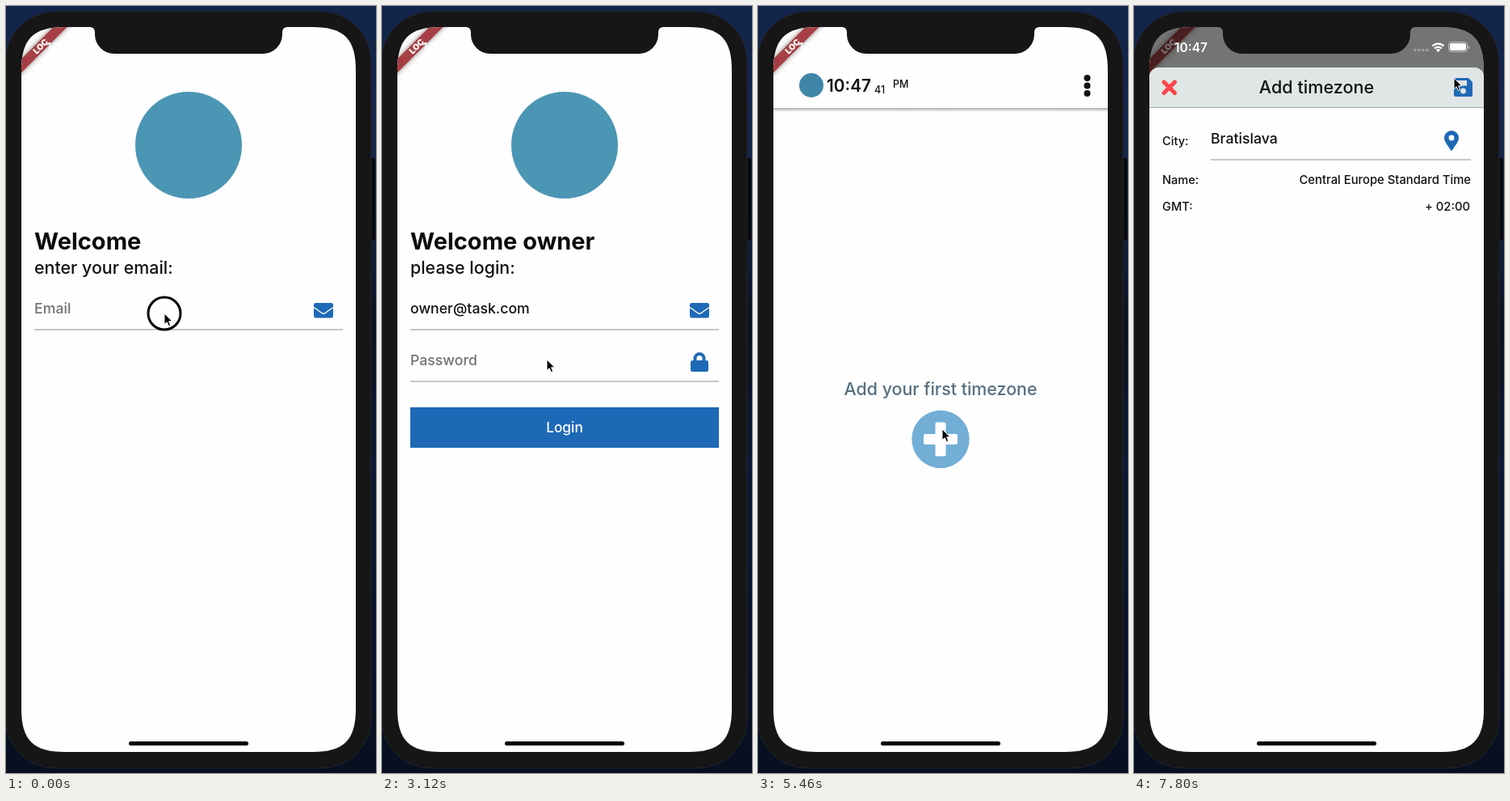
Write an HTML page that moves like this. It is 458 by 948 pixels and loops after 8000 ms.

```html
<!DOCTYPE html>
<html lang="en">
<head>
<meta charset="utf-8">
<title>Time zone app</title>
<style>
html, body { margin: 0; width: 100%; height: 100%; overflow: hidden; background: #0b1830; }
svg { display: block; width: 458px; height: 948px; }
text { font-family: Inter, "Open Sans", sans-serif; font-weight: 500; white-space: pre; }
</style>
</head>
<body>
<svg viewBox="0 0 458 948" xmlns="http://www.w3.org/2000/svg">
  <defs>
    <linearGradient id="sky" x2="0" y2="1">
      <stop offset="0" stop-color="#12254a"/><stop offset=".25" stop-color="#14264a"/>
      <stop offset=".42" stop-color="#0a1220"/><stop offset=".6" stop-color="#0b1a38"/>
      <stop offset="1" stop-color="#070f20"/>
    </linearGradient>
    <linearGradient id="shade" x2="0" y2="1">
      <stop offset="0" stop-color="#000" stop-opacity=".32"/><stop offset="1" stop-color="#000" stop-opacity="0"/>
    </linearGradient>
    <filter id="soft" x="-30%" y="-30%" width="160%" height="160%">
      <feDropShadow dx="0" dy="0" stdDeviation="3" flood-opacity=".5"/>
    </filter>
    <clipPath id="screen">
      <path d="M73 26H379C418.500 26 433 40.500 433 80V868C433 907.500 418.500 922 379 922H73C33.500 922 19 907.500 19 868V80C19 40.500 33.500 26 73 26Z"/>
    </clipPath>
  </defs>
  <rect width="458" height="948" fill="url(#sky)"/>
  <path d="M0 128v29M0 190v58M0 260v57" stroke="#000" stroke-width="3"/>
  <rect x="449" y="188" width="8" height="102" rx="2" fill="#08090c"/>
  <rect x="-1" y="7" width="453" height="935" rx="62" fill="#161616" stroke="#22252b"/>
  <g id="view" clip-path="url(#screen)"></g>
  <path d="M104 26a6 6 0 0 1 6 6V35a24 24 0 0 0 24 24H318a24 24 0 0 0 24-24V32a6 6 0 0 1 6-6V24H104Z" fill="#161616"/>
  <g id="pointer"></g>
</svg>
<script>
const LOOP = 8000, STEP = 260;
const BLUE = '#1e69b6', HINT = '#727272';
const EMAIL = 'owner@task.com', CITY = 'Bratislava';
const view = document.getElementById('view');
const pointer = document.getElementById('pointer');
const pen = document.createElement('canvas').getContext('2d');

const clamp = v => Math.max(0, Math.min(1, v));
const easeOut = (t, a, b) => 1 - (1 - clamp((t - a) / (b - a))) ** 3;
const during = (t, a, b) => t >= a && t < b;
const typed = (word, t, start, pace) => word.slice(0, Math.max(0, Math.floor((t - start) / pace + .01)));

const rect = (x, y, w, h, fill, rx = 0) =>
  `<rect x="${x}" y="${y}" width="${w}" height="${h}" rx="${rx}" fill="${fill}"/>`;
const circle = (x, y, r, fill) => `<circle cx="${x}" cy="${y}" r="${r}" fill="${fill}"/>`;
const path = (d, fill, more = '') => `<path d="${d}" fill="${fill}" ${more}/>`;
const line = (d, color, w, more = '') => path(d, 'none', `stroke="${color}" stroke-width="${w}" ${more}`);
const text = (s, x, y, size, fill = '#111', more = '') =>
  `<text x="${x}" y="${y}" font-size="${size}" fill="${fill}" ${more}>${s}</text>`;
const weight = w => `style="font-weight:${w}"`;
const MID = 'text-anchor="middle"', END = 'text-anchor="end"';
const LIGHT = `${MID} ${weight(400)}`;

const mail = rect(381, 367, 24, 18.5, BLUE, 2.5) +
  line('M381 372.5L391 379.5Q393 381 395 379.5L405 372.5', '#fff', 1.5);
const lock = rect(382, 438, 22, 14, BLUE, 2.5) +
  line('M387.5 439V435.5a5.5 5.5 0 0 1 11 0V439', BLUE, 4);
const pin = path('M393 179.5C389 173 384 168 384 163a9 9 0 0 1 18 0C402 168 397 173 393 179.5Z', BLUE) +
  circle(393, 163, 3.4, '#fff');
const save = path('M398 89H414L419 94V110a2 2 0 0 1-2 2H398a2 2 0 0 1-2-2V91a2 2 0 0 1 2-2Z', BLUE) +
  rect(399.5, 92, 12.5, 6.5, '#e0e5e6') + circle(407.5, 105, 3.4, '#e0e5e6');

function field(value, hint, x, y, focused, lineY) {
  pen.font = '500 17.7px Inter, "Open Sans", sans-serif';
  const end = x + pen.measureText(value).width;
  return text(value || hint, x, y, 17.7, value ? '#111' : HINT) +
    line(`M${x} ${lineY}H417`, focused ? '#1f78ba' : '#b4b4b4', focused ? 2.2 : 1.5) +
    (focused ? rect(end - .5, y - 17, 2, 23, '#1f78ba') : '');
}

function signIn(t) {
  const known = t >= 2860;
  const dots = Math.floor(clamp((t - 3510) / 650) * 5 + .01);
  const mailText = typed(EMAIL, t, 520, 130);
  let s = circle(226, 172, 66, '#4b96b4') +
    text(known ? 'Welcome owner' : 'Welcome', 35, 301, 29, '#0b0b0b', weight(700)) +
    text(known ? 'please login:' : 'enter your email:', 35, 331, 21.4) +
    field(mailText, 'Email', 35, 380, during(t, 260, 2500), 400) + mail;
  if (!known) return s;
  s += field('', dots ? '' : 'Password', 35, 444, false, 464) + lock;
  if (during(t, 3380, 4100)) {
    s += line('M35 464H417', '#1f78ba', 2.2) + rect(35 + dots * 7.4, 427, 2, 23, '#1f78ba');
  }
  for (let i = 0; i < dots; i++) s += circle(38.5 + i * 7.4, 438.5, 2.4, '#111');
  return s + rect(35, 496, 382, 50, BLUE) + text('Login', 226, 527, 17.3, '#fff', MID);
}

function home(t) {
  const sec = 41 + Math.floor((t - 5460) / 1000);
  return rect(19, 126, 414, 5, 'url(#shade)') + circle(66, 98, 15, '#3f86a8') +
    text('10:47', 85, 106, 20.8, '#111', weight(600)) + text(sec, 144, 108, 12.5) + text('PM', 167, 101, 12.5) +
    [89, 98.5, 108].map(y => circle(407.5, y, 4, '#111')).join('') +
    text('Add your first timezone', 226, 481, 21.4, '#566f80', MID) +
    circle(226, 535.5, 35.7, '#72aed6') +
    rect(205, 529, 42, 13, '#fff', 2) + rect(219.5, 514.5, 13, 42, '#fff', 2);
}

function dialog(t) {
  const city = typed(CITY, t, 6500, 78);
  let s = path('M19 922V88a12 12 0 0 1 12-12H421a12 12 0 0 1 12 12V922Z', '#fefefe') +
    path('M19 125V88a12 12 0 0 1 12-12H421a12 12 0 0 1 12 12V125Z', '#e0e5e6') +
    line('M19 125.5H433', '#a5adb1', 1) +
    line('M37 94L50.5 107.5M50.5 94L37 107.5', '#f8474a', 5.2, 'stroke-linecap="round"') +
    text('Add timezone', 226, 108, 21.6, '#111', MID) + save +
    text('City:', 35, 172, 14.6) + field(city, 'Type city...', 95, 170, during(t, 6240, 7400), 190) + pin;
  if (t >= 7540) {
    s += text('Name:', 35, 220, 14.6) + text('Central Europe Standard Time', 417, 220, 14.8, '#111', END) +
      text('GMT:', 35, 253, 14.6) + text('+ 02:00', 416, 253, 14.8, '#111', END);
  }
  return s;
}

function key(x, y, w, label, fill = '#898989', size = 25) {
  return rect(x, y + 1, w, 45, '#484848', 5) + rect(x, y, w, 45, fill, 5) +
    text(label, x + w / 2, y + (size > 20 ? 30 : 28), size, '#fff', LIGHT);
}

function keyboard(kind, words) {
  const dark = '#666';
  let s = rect(19, 576, 414, 346, '#5e5e5e') + line('M156.5 590V612M294.5 590V612', '#707070', 1);
  words.forEach((w, i) => s += text(w, 88 + i * 138, 608, 17, '#eee', LIGHT));
  [['qwertyuiop', 23.5, 629], ['asdfghjkl', 44, 685], ['zxcvbnm', 85.5, 741]].forEach(([row, x, y]) =>
    [...row].forEach((c, i) => s += key(x + i * 41.1, y, 35.5, c)));
  s += key(24, 741, 45, '', dark) + key(385, 741, 44, '', dark) +
    line('M46 755L55.5 764.5H50.5V772.5H41.5V764.5H36.5Z', '#fff', 1.6, 'stroke-linejoin="round"') +
    line('M402 756.5H416a2 2 0 0 1 2 2V769a2 2 0 0 1-2 2H402L395.5 763.7ZM404.5 760L411.5 767.5M411.5 760L404.5 767.5', '#fff', 1.5) +
    key(24, 797, 97, '123', dark, 16.5) + key(332, 797, 97, 'done', '#226ffb', 16.5);
  s += kind === 'email'
    ? key(127, 797, 97, 'space', '#898989', 16.5) + key(230, 797, 45, '@', '#898989', 18) + key(281, 797, 45, '.', '#898989', 18)
    : key(127, 797, 199, 'space', '#898989', 16.5);
  s += circle(60.5, 881.5, 13.5, '#fff') + circle(56, 877.5, 2, '#5e5e5e') + circle(65, 877.5, 2, '#5e5e5e') +
    path('M51.5 883H69.5a9 7.5 0 0 1-18 0Z', '#5e5e5e') + line('M54 885H67', '#fff', 2);
  if (kind === 'city') {
    s += rect(388, 867, 9, 17, '#fff', 4.5) +
      line('M384 877v3a8.5 8 0 0 0 17 0v-3M392.5 888V894M387 894H398', '#fff', 1.8);
  }
  return s;
}

function suggestions(kind, t) {
  if (kind === 'password') return [];
  const word = kind === 'city' ? typed(CITY, t, 6500, 78) : typed(EMAIL, t, 520, 130).split(/[@.]/).pop();
  return word === 'task' ? ['“task”', 'tasking', 'tasks'] : word ? [`“${word}”`] : [];
}

// kind, rise start, rise end, fall start, fall end
const boards = [['email', 100, 520, 2500, 2900], ['password', 3380, 3700, 4080, 4520], ['city', 6110, 6490, 7300, 7720]];

function boardLayer(t) {
  const b = boards.find(b => during(t, b[1], b[4]));
  if (!b) return '';
  const up = easeOut(t, b[1], b[2]) - easeOut(t, b[3], b[4]);
  return `<g transform="translate(0 ${(346 * (1 - up)).toFixed(1)})">${keyboard(b[0], suggestions(b[0], t))}</g>`;
}

const status = text('10:47', 50, 56.5, 15.5, '#fff', weight(600)) +
  [348, 353, 358, 363].map(x => circle(x, 54.5, 1.8, '#ffffff55')).join('') +
  line('M369.5 49.5a10 10 0 0 1 14 0M372 52.5a6.5 6.5 0 0 1 9 0', '#fff', 2.2) +
  path('M376.5 57L373.8 54.3a4 4 0 0 1 5.4 0Z', '#fff') +
  line('M392.5 44.5H409.5a3 3 0 0 1 3 3V53.5a3 3 0 0 1-3 3H392.5a3 3 0 0 1-3-3V47.5a3 3 0 0 1 3-3Z', '#ffffff88', 1) +
  rect(391, 46, 20, 9, '#fff', 2) + rect(413.5, 49, 1.5, 4, '#ffffff88', 1);
const ribbon = path('M58.6 26L80 4.600H97L19 82.600L0 101.600V84.600Z', '#a64144', 'filter="url(#soft)"') +
  text('LOC', 0, 0, 10.4, '#fff', `${MID} transform="translate(45.500 52.500) rotate(-45)" ${weight(900)}`);

// time, x, y of the pointer tip
const stops = [[0, 196, 380], [2340, 196, 380], [3000, 204, 437], [3900, 204, 437], [4420, 204, 536],
  [4700, 204, 536], [5400, 228, 523], [5740, 228, 523], [6230, 161, 157], [7280, 161, 157], [7750, 396, 89], [LOOP, 396, 89]];
const clicks = [0, 3380, 4680, 5720, 6240];

function drawPointer(t) {
  const i = stops.findIndex(s => s[0] > t) - 1;
  const [a, b] = [stops[i], stops[i + 1]];
  const p = (t - a[0]) / (b[0] - a[0]), k = p * p * (3 - 2 * p);
  const x = a[1] + (b[1] - a[1]) * k, y = a[2] + (b[2] - a[2]) * k;
  const ring = clicks.includes(t) ? '<circle r="20" fill="none" stroke="#000" stroke-width="3"/>' : '';
  pointer.setAttribute('transform', `translate(${x.toFixed(1)} ${y.toFixed(1)})`);
  pointer.innerHTML = ring +
    path('M0 0V13.5L3.2 10.7L5.3 15.6L7.7 14.6L5.6 9.8H10Z', '#000', 'stroke="#fff" stroke-width="1"');
}

function draw(t) {
  const open = easeOut(t, 5850, 6200);
  let s = rect(19, 26, 414, 896, '#fefefe') + (t < 5200 ? signIn(t) : home(t)) + ribbon;
  if (open) {
    s += rect(19, 26, 414, 896, `rgba(0,0,0,${.54 * open})`) +
      `<g transform="translate(0 ${850 * (1 - open)})">${dialog(t)}</g>`;
  }
  view.innerHTML = s + status + boardLayer(t) + rect(152, 909, 148, 5, '#000', 2.5);
  drawPointer(t);
}

let shown = -1;
function tick(now) {
  const t = Math.floor(now % LOOP / STEP) * STEP;
  if (t !== shown) draw(shown = t);
  requestAnimationFrame(tick);
}
tick(performance.now());
</script>
</body>
</html>
```
